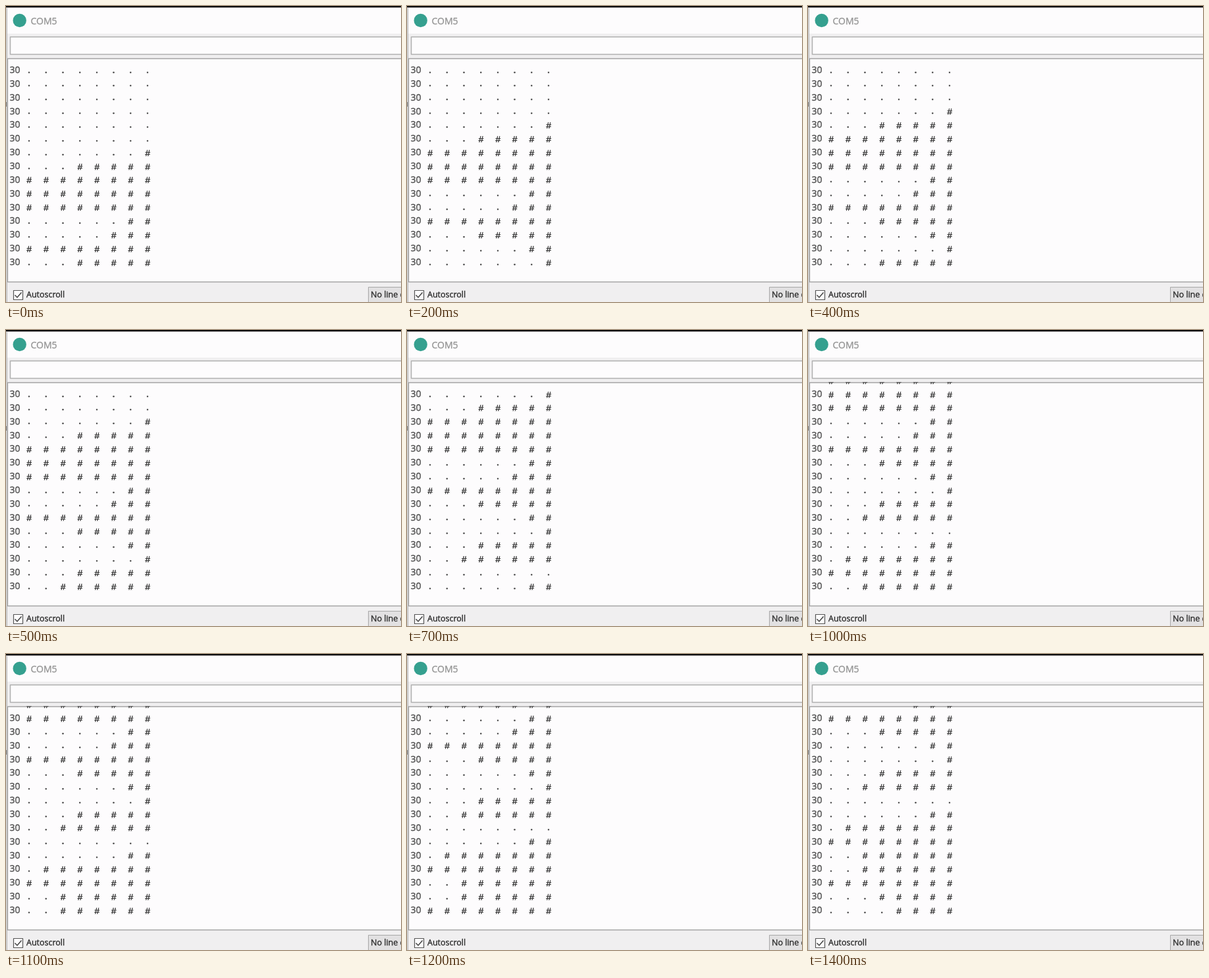
Recreate the animation shown at these times as an HTML page with a canvas. Size 600 by 450 pixels, loop 1.5 s.

```html
<!DOCTYPE html>
<html lang="en">
<head>
<meta charset="utf-8">
<title>Serial monitor</title>
<style>
  html, body { margin: 0; width: 100%; height: 100%; overflow: hidden; background: #f0f0f0; }
  canvas { display: block; width: 600px; height: 450px; }
</style>
</head>
<body>
<canvas id="stage" width="600" height="450"></canvas>
<script>
const ctx = document.getElementById('stage').getContext('2d');
const LOOP = 1500, STEP = 100;
const ROWS = 15, COLS = 8, ROW_HEIGHT = 20.86, COL_WIDTH = 25.72;
const UI = '"Open Sans", "Noto Sans", sans-serif';
const HASH_FONT = 'italic 13.5px "Liberation Sans", Arial, sans-serif';

// Each printed line ends in this many hash marks.
const levels = [...'0000001588823852156027866854'].map(Number);

function box(x, y, w, h, fill, line, lineWidth = 1) {
  ctx.fillStyle = fill;
  ctx.fillRect(x, y, w, h);
  if (line) {
    ctx.strokeStyle = line;
    ctx.lineWidth = lineWidth;
    ctx.strokeRect(x + 0.5, y + 0.5, w - 1, h - 1);
  }
}

// A thin outline gives the text its soft, heavy look.
function label(text, x, y, font, color, weight = 0.35, align = 'left') {
  ctx.font = font;
  ctx.fillStyle = ctx.strokeStyle = color;
  ctx.lineWidth = weight;
  ctx.lineJoin = 'round';
  ctx.textAlign = align;
  ctx.fillText(text, x, y);
  ctx.strokeText(text, x, y);
}

function drawWindow() {
  box(0, 0, 600, 450, '#f0eff0');
  box(0, 3, 600, 39, '#fdfcfd');
  box(6, 46.6, 610, 27.4, '#fdfcfd', '#b0b0b0', 1.5);
  box(2, 79.5, 610, 340.5, '#fdfcfd', '#a4a4a4', 1.3);
  box(0, 0, 600, 2, '#080808');
  box(0, 2, 600, 1, '#b4b0b2');
  box(0, 3, 1, 447, '#dcdcdc');
  box(1, 3, 1, 447, '#b8b8b8');
  box(0, 146, 1, 7, '#777');

  ctx.fillStyle = '#35a08f';
  ctx.beginPath();
  ctx.arc(20.7, 22, 10.2, 0, Math.PI * 2);
  ctx.fill();
  label('COM5', 37.5, 27.5, '14px ' + UI, '#959595');

  box(11, 432, 15, 15, '#fdfcfd', '#555', 1.2);
  ctx.strokeStyle = '#444';
  ctx.lineWidth = 1.5;
  ctx.beginPath();
  ctx.moveTo(13.5, 439.5);
  ctx.lineTo(17, 443);
  ctx.lineTo(23.5, 435.5);
  ctx.stroke();
  label('Autoscroll', 31, 443, '12.5px ' + UI, '#2a2a2a');

  box(550, 427, 60, 30, '#e2e1e2', '#a8a8a8');
  label('No line ending', 554, 443, '12.5px ' + UI, '#2a2a2a');
}

function drawLine(level, row) {
  const base = 102 + row * ROW_HEIGHT;
  if (row >= 0) label('30', 5.5, base, '14px ' + UI, '#4c4c4c');
  for (let col = 0; col < COLS; col++) {
    const x = 35 + col * COL_WIDTH;
    if (col >= COLS - level) {
      label('#', x, base + 0.5, HASH_FONT, '#383838', 0.5, 'center');
    } else if (row >= 0) {
      label('.', x, base - 0.4, '15px ' + UI, '#484848', 0.7, 'center');
    }
  }
}

function draw(time) {
  const tick = Math.floor((time % LOOP) / STEP);
  // The output pauses for one step early in the loop.
  const scroll = tick - (tick > 2 ? 1 : 0);
  drawWindow();
  ctx.save();
  ctx.beginPath();
  ctx.rect(3, 79.5, 597, 339.5);
  ctx.clip();
  for (let row = -1; row < ROWS; row++) drawLine(levels[scroll + row] || 0, row);
  ctx.restore();
}

let start;
function animate(now) {
  start ??= now;
  draw(now - start);
  requestAnimationFrame(animate);
}
draw(0);
requestAnimationFrame(animate);
</script>
</body>
</html>
```
